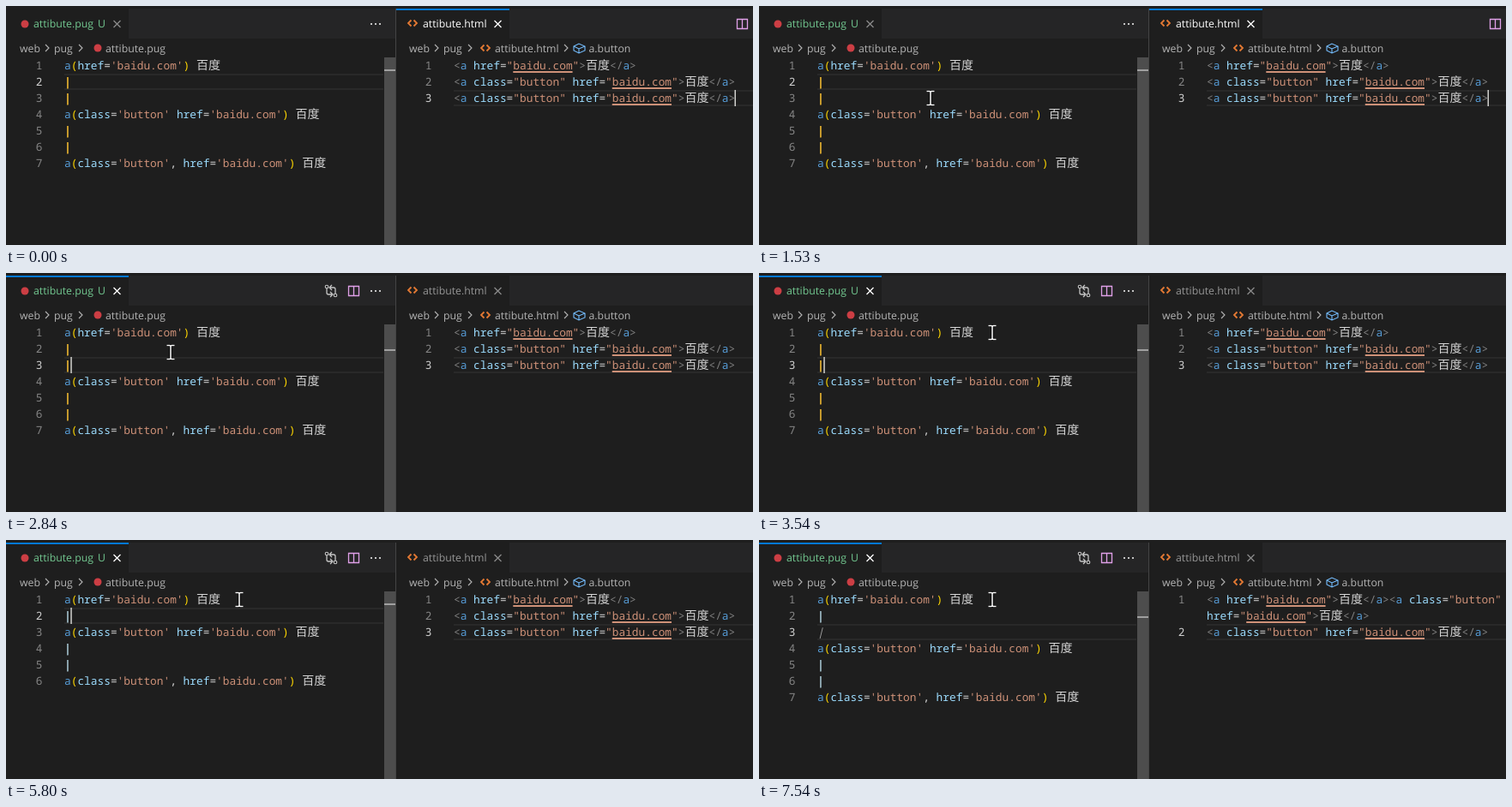
These frames come from a looping animation (871 by 279 pixels, 8 s). An HTML page:

```html
<!DOCTYPE html>
<html lang="en">
<head>
<meta charset="utf-8">
<title>Editor</title>
<style>
  html, body { margin: 0; width: 100%; height: 100%; overflow: hidden; background: #1e1e1e; }
  svg { display: block; width: 871px; height: 279px; }
  text { white-space: pre; text-rendering: geometricPrecision; }
  .code { font: 500 12.83px "Noto Sans Mono", monospace; fill: #d4d4d4; }
  .ui { font: 12.3px "Open Sans", sans-serif; fill: #b4b4b4; }
  .num { text-anchor: end; fill: #858585; }
  .now { fill: #d0d0d0; }
  .str { fill: #ce9178; }
  .tag { fill: #569cd6; }
  .attr { fill: #9cdcfe; }
  .gold { fill: #ffd700; }
  .bar { fill: #f0b932; stroke: #f0b932; stroke-width: .6; }
  .loose .bar { fill: #a5c3cf; stroke: #a5c3cf; }
  .gray { fill: #808080; }
  .cjk { font: 14px "Noto Sans CJK SC", "Noto Sans CJK", sans-serif; }
  .ghost { fill: #a0a0a0; font-style: italic; }
  .line { fill: none; stroke: #c5c5c5; stroke-width: 1.1; }
</style>
</head>
<body>
<svg id="stage" viewBox="0 0 871 279"></svg>
<script>
const LOOP = 8000, CHAR = 7.698, ROW = 19, TOP = 60;
const LEFT = { x: 68, num: 42.5, end: 440 };
const RIGHT = { x: 522, num: 496.5, end: 871 };

const PUG = /(?<str>'[^']*')|(?<tag>^a)|(?<gold>[()])|(?<bar>\|)|(?<attr>class|href)|(?<cjk>[一-龥]+)|(?<txt>[=, ]+)/g;
const HTML = /(?<str>"[^"]*")|(?<attr>class|href)|(?<tag>\ba\b)|(?<gray>[<>\/]+)|(?<cjk>[一-龥]+)|(?<txt>[= ]+)/g;

const rowY = row => TOP + ROW * (row - 1);
const escape = s => s.replace(/&/g, '&amp;').replace(/</g, '&lt;');
const text = (cls, x, y, body) => `<text class="${cls}" x="${x}" y="${y}">${body}</text>`;
const ui = (x, y, s, attrs = '') => `<text class="ui" x="${x}" y="${y}" ${attrs}>${s}</text>`;
const rect = (x, y, w, h, fill) => `<rect x="${x}" y="${y}" width="${w}" height="${h}" fill="${fill}"/>`;
const path = (d, attrs = '') => `<path class="line" d="${d}" ${attrs}/>`;

// A group that is visible only inside the given [from, to] spans.
const during = (spans, body, cls = '') => `<g class="${cls}" data-on='${JSON.stringify(spans)}'>${body}</g>`;

const paint = (src, rules) => [...src.matchAll(rules)].map(m => {
  const kind = Object.keys(m.groups).find(k => m.groups[k] !== undefined);
  return `<tspan class="${kind}">${escape(m[0])}</tspan>`;
}).join('');

const lines = (pane, rules, list) =>
  list.map((src, i) => text('code', pane.x, rowY(i + 1) + 14, paint(src, rules))).join('');

const numbers = (pane, list, active) =>
  list.map((n, i) => text(i + 1 === active ? 'code num now' : 'code num', pane.num, rowY(i + 1) + 14, n)).join('');

const links = (list, rows) => rows.map(row => {
  const x = RIGHT.x + CHAR * list[row - 1].indexOf('baidu.com');
  return rect(x, rowY(row) + 16, CHAR * 9, 2, '#ce9178');
}).join('');

const highlight = (pane, row) =>
  [0, ROW - 2].map(dy => rect(pane.x, rowY(row) + dy, pane.end - pane.x, 2, '#292929')).join('');

const caret = (x, row) => rect(x, rowY(row), 1.5, ROW, '#d0d0cd');
const cross = (x, color) => path(`M${x - 4} 17l8 8m0-8l-8 8`, `style="stroke:${color};stroke-width:1.3"`);
const chevron = x => path(`M${x - 2} 45l4 4l-4 4`, 'style="stroke:#b4b4b4"');
const angles = (x, y) => path(`M${x - 1.5} ${y - 3.5}l-3.5 3.5l3.5 3.5m3-7l3.5 3.5l-3.5 3.5`, 'style="stroke:#e37933;stroke-width:1.8"');
const dot = (x, y) => `<circle cx="${x}" cy="${y}" r="4.5" fill="#cc3e44"/>`;
const split = x => path(`M${x - 6} 15.5h12v11h-12zM${x} 15.5v11`, 'style="stroke:#e0a0e8;stroke-width:1.3"');
const tabTop = (x, w) => rect(x, 3, w, 2, '#0078d4');

const first = "a(href='baidu.com') 百度";
const spaced = "a(class='button' href='baidu.com') 百度";
const comma = "a(class='button', href='baidu.com') 百度";
const pugFull = [first, '|', '|', spaced, '|', '|', comma];
const pugBlank = [first, '|', '', spaced, '|', '|', comma];
const pugShort = [first, '|', spaced, '|', '|', comma];

const plainLink = '<a href="baidu.com">百度</a>';
const buttonLink = '<a class="button" href="baidu.com">百度</a>';
const htmlSplit = [plainLink, buttonLink, buttonLink];
const htmlJoined = [plainLink + '<a class="button"', 'href="baidu.com">百度</a>', buttonLink];

const seven = [1, 2, 3, 4, 5, 6, 7], six = seven.slice(0, 6);
const onRow2 = [[0, 2640], [4800, 7030]];
const onRow3 = [[2640, 4800], [7030, LOOP]];

const chrome = [
  rect(0, 0, 871, 279, '#1e1e1e'),
  rect(0, 3, 871, 35, '#252526'),
  rect(0, 3, 143, 35, '#1e1e1e'),
  rect(455, 3, 132, 35, '#1e1e1e'),
  rect(441, TOP, 13, 219, '#4d4d4d'),
  rect(454, 3, 1, 276, '#444'),
  dot(22, 21), ui(32, 25, 'attibute.pug', 'style="fill:#73c991"'), ui(107, 25, 'U', 'style="fill:#73c991"'),
  [426, 431, 436].map(x => rect(x - 1, 20, 2, 2, '#c5c5c5')).join(''),
  ui(16, 53.5, 'web'), chevron(48), ui(56, 53.5, 'pug'), chevron(87), dot(107, 49), ui(116, 53.5, 'attibute.pug'),
  angles(474, 20),
  ui(470, 53.5, 'web'), chevron(502), ui(510, 53.5, 'pug'), chevron(541), angles(559, 49),
  ui(570, 53.5, 'attibute.html'), chevron(653),
  path('M662 47l6-3l7 3v5l-7 3l-6-3zl6 3l7-3m-7 3v5', 'style="stroke:#75beff"'),
  ui(679.5, 53.5, 'a.button')
];

const focus = [
  during([[0, 2640]], tabTop(455, 132) + cross(129.5, '#8a8a8a') +
    ui(486, 25, 'attibute.html', 'style="fill:#fff"') + cross(573.5, '#fff') + split(858.5)),
  during([[2640, LOOP]], tabTop(0, 143) + cross(129.5, '#fff') +
    ui(486, 25, 'attibute.html', 'style="fill:#969696"') + cross(573.5, '#8a8a8a') + split(405.5) +
    path('M374 18v5q0 2 2 2h4m-2-3l3 3l-3 3M384 24v-5q0-2-2-2h-4m2-3l-3 3l3 3', 'style="stroke-width:1.3"') +
    '<circle class="line" cx="374" cy="16" r="1.8"/><circle class="line" cx="384" cy="26" r="1.8"/>')
];

const leftPane = [
  during(onRow2, highlight(LEFT, 2) + rect(441, 74, 13, 2, '#a0a0a0')),
  during(onRow3, highlight(LEFT, 3) + rect(441, 89, 13, 2, '#a0a0a0')),
  during([[0, 2640]], numbers(LEFT, seven, 2)),
  during(onRow3, numbers(LEFT, seven, 3)),
  during([[0, 4220]], lines(LEFT, PUG, pugFull)),
  during([[4220, 4740]], lines(LEFT, PUG, pugBlank)),
  during([[4740, 4800], [7030, LOOP]], lines(LEFT, PUG, pugBlank), 'loose'),
  during([[4800, 7030]], numbers(LEFT, six, 2) + lines(LEFT, PUG, pugShort), 'loose'),
  during([[4280, 4800], [7140, LOOP]], text('code ghost', LEFT.x, rowY(3) + 14, '|')),
  during([[2640, 3770]], caret(75.3, 3)),
  during([[4220, 4740], [7030, 7540]], caret(68, 3)),
  during([[4800, 5300], [5800, 6360], [6870, 7030]], caret(75.3, 2))
];

const rightPane = [
  highlight(RIGHT, 3),
  during([[0, 6060]], numbers(RIGHT, [1, 2, 3], 3) + lines(RIGHT, HTML, htmlSplit) + links(htmlSplit, [1, 2, 3])),
  during([[6060, LOOP]], numbers(RIGHT, [1, '', 2], 3) + lines(RIGHT, HTML, htmlJoined) + links(htmlJoined, [3])),
  during([[7090, LOOP]], links(htmlJoined, [1, 2])),
  during([[0, 2030], [2530, 2640]], caret(849.5, 3))
];

const beam = 'M-4.5-8h3.5l1 1l1-1h3.5M0-7v14M-4.5 8h3.5l1-1l1 1h3.5';
const pointer = during([[100, LOOP]], `<g id="pointer">
  <path d="${beam}" fill="none" stroke="#000" stroke-width="3"/>
  <path d="${beam}" fill="none" stroke="#fff" stroke-width="1.5"/></g>`);

const stage = document.getElementById('stage');
stage.innerHTML = [...chrome, ...focus, ...leftPane, ...rightPane, pointer].join('');

const timed = [...stage.querySelectorAll('[data-on]')].map(el => ({ el, spans: JSON.parse(el.dataset.on) }));
const pointerEl = document.getElementById('pointer');

// time, x, y
const track = [
  [100, 324, 262.5], [830, 261, 130.5], [1530, 200, 107.5], [1730, 196, 104.5],
  [2530, 188, 93.5], [2730, 188, 92.5], [2830, 192, 92.5], [3530, 272, 69.5]
];

function pointerAt(t) {
  const tick = Math.floor((t - 30) / 100) * 100 + 30;
  const next = track.findIndex(k => k[0] > tick);
  if (next === 0) return track[0].slice(1);
  if (next < 0) return track[track.length - 1].slice(1);
  const a = track[next - 1], b = track[next], p = (tick - a[0]) / (b[0] - a[0]);
  return [1, 2].map(i => a[i] + (b[i] - a[i]) * p);
}

function show(now) {
  const t = now % LOOP;
  for (const { el, spans } of timed)
    el.style.display = spans.some(([from, to]) => t >= from && t < to) ? '' : 'none';
  const [x, y] = pointerAt(t);
  pointerEl.setAttribute('transform', `translate(${Math.round(x)} ${Math.round(y * 2) / 2})`);
}

const start = performance.now();
function frame() {
  show(performance.now() - start);
  requestAnimationFrame(frame);
}
frame();
</script>
</body>
</html>
```
